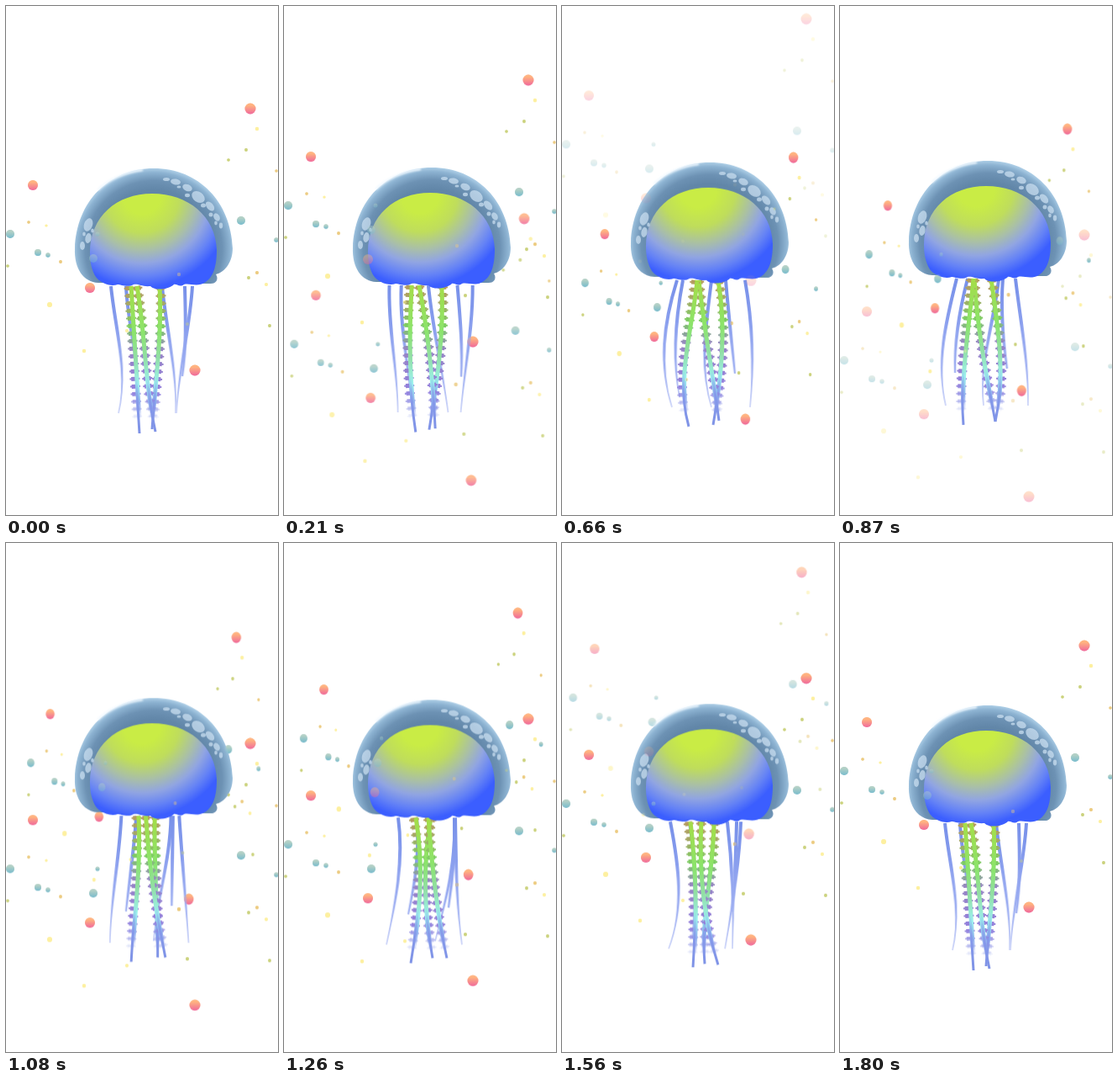
An HTML page without scripts for the animation above (1830 ms loop, 324 by 605 pixels).

```html
<!DOCTYPE html>
<html lang="en">
<head>
<meta charset="utf-8">
<title>Jellyfish</title>
<style>
  html, body { margin: 0; width: 100%; height: 100%; overflow: hidden; background: #fff; }
  svg { display: block; width: 324px; height: 605px; }

  .bob { animation: bob 1.83s infinite; }
  @keyframes bob {
    0% { transform: none; animation-timing-function: cubic-bezier(.37, 0, .63, 1); }
    52.46% { transform: translateY(-9.2px); animation-timing-function: cubic-bezier(.37, 0, .63, 1); }
    98.36%, 100% { transform: none; }
  }

  /* two copies of the bubbles rise out of phase; one also narrows */
  .first { animation: rise 1.83s steps(61, jump-none) infinite, fade 1.83s linear infinite; }
  .second { animation: rise-late 1.83s infinite, fade-late 1.83s linear infinite; }
  .squash { transform-origin: 175px 0; animation: squash 1.83s infinite; }
  .over { opacity: .42; }
  @keyframes rise {
    from { transform: translateY(164.7px); }
    to { transform: translateY(-126px); }
  }
  @keyframes rise-late {
    0% { transform: translateY(0); animation-timing-function: steps(26); }
    42.622% { transform: translateY(-126px); animation-timing-function: step-start; }
    42.623% { transform: translateY(164.7px); animation-timing-function: steps(34); }
    98.36%, 100% { transform: translateY(0); }
  }
  @keyframes fade {
    0%, 98.36%, 100% { opacity: 0; }
    14.75%, 68.85% { opacity: 1; }
  }
  @keyframes fade-late {
    0%, 13.1%, 57.38%, 100% { opacity: 1; }
    42.62% { opacity: 0; }
  }
  @keyframes squash {
    0% { transform: scaleX(1); animation-timing-function: steps(30); }
    49.18% { transform: scaleX(.82); animation-timing-function: steps(30); }
    98.36%, 100% { transform: scaleX(1); }
  }

  .tent { fill: none; }
  .thin { stroke: url(#thin); stroke-width: 1.9; }
  .thick { stroke: url(#thick); stroke-width: 4; }
  .teeth { stroke: url(#frill); stroke-width: 12; stroke-dasharray: 2 7; stroke-dashoffset: -1.5; }
  .base { stroke: url(#frill); stroke-width: 8.5; stroke-dasharray: 5 4; }
  .core { stroke: url(#core); stroke-width: 5; }
  .tip { stroke: url(#tip); stroke-width: 3; }
  .spots { fill: #c9def0; opacity: .75; }
  .pink { fill: url(#pink); }
  .teal { fill: url(#teal); }
  .pale { fill: #fdf0a0; }
  .olive { fill: #cbd27c; }
  .gold { fill: #eccb80; }
</style>
</head>
<body>
<svg viewBox="0 0 324 605">
  <defs>
    <linearGradient id="pink" x2="0" y2="1">
      <stop offset=".2" stop-color="#ffb380"/><stop offset="1" stop-color="#f06a9c"/>
    </linearGradient>
    <linearGradient id="teal" x2="0" y2="1">
      <stop offset=".2" stop-color="#b3d0c6"/><stop offset="1" stop-color="#78bccd"/>
    </linearGradient>
    <linearGradient id="thin" gradientUnits="userSpaceOnUse" x1="0" x2="0" y1="333" y2="485">
      <stop stop-color="#7088e8"/><stop offset=".6" stop-color="#93a6f0"/><stop offset="1" stop-color="#d3daf9"/>
    </linearGradient>
    <linearGradient id="thick" gradientUnits="userSpaceOnUse" x1="0" x2="0" y1="333" y2="460">
      <stop stop-color="#7790e9"/><stop offset=".4" stop-color="#8a9fee"/><stop offset="1" stop-color="#a9b8f4" stop-opacity="0"/>
    </linearGradient>
    <linearGradient id="frill" gradientUnits="userSpaceOnUse" x1="0" x2="0" y1="333" y2="492">
      <stop stop-color="#b59a5c"/><stop offset=".14" stop-color="#a5a866"/><stop offset=".3" stop-color="#7dcc62"/>
      <stop offset=".48" stop-color="#9684c4"/><stop offset=".78" stop-color="#937fdc"/><stop offset="1" stop-color="#8498ea" stop-opacity="0"/>
    </linearGradient>
    <linearGradient id="core" gradientUnits="userSpaceOnUse" x1="0" x2="0" y1="333" y2="490">
      <stop stop-color="#a5dd48"/><stop offset=".35" stop-color="#8be46c"/><stop offset=".55" stop-color="#92dfa8"/>
      <stop offset=".74" stop-color="#9df3ee"/><stop offset=".88" stop-color="#8fb0ee"/><stop offset="1" stop-color="#8498ea" stop-opacity="0"/>
    </linearGradient>
    <linearGradient id="tip" gradientUnits="userSpaceOnUse" x1="0" x2="0" y1="440" y2="508">
      <stop stop-color="#8498ea" stop-opacity="0"/><stop offset=".5" stop-color="#8498ea"/><stop offset="1" stop-color="#7f93e6"/>
    </linearGradient>
    <radialGradient id="shell" gradientUnits="userSpaceOnUse" cx="176" cy="289" r="97">
      <stop offset=".72" stop-color="#6186a8"/><stop offset=".84" stop-color="#6d92b4"/>
      <stop offset=".94" stop-color="#8db3d2"/><stop offset="1" stop-color="#b3d3ea"/>
    </radialGradient>
    <radialGradient id="dome" gradientUnits="userSpaceOnUse" cx="162" cy="225" r="112">
      <stop offset=".2" stop-color="#c9ec45"/><stop offset=".4" stop-color="#bfdd5c"/><stop offset=".58" stop-color="#a9bfa8"/>
      <stop offset=".72" stop-color="#91a5e2"/><stop offset=".86" stop-color="#6482f6"/><stop offset=".98" stop-color="#3b5eff"/>
    </radialGradient>
    <filter id="soft"><feGaussianBlur stdDeviation="1"/></filter>

    <path id="l1" d="M125 333C130 384 146 434 134 484">
      <animate attributeName="d" dur="1.83s" repeatCount="indefinite" keyTimes="0;.213;.361;.475;.689;.852;.984;1" values="M125 333C130 384 146 434 134 484;M126 333C118 384 127 434 137 484;M137 333C121 384 115 434 131 484;M139 333C126 384 114 434 126 484;M136 333C143 384 133 434 122 484;M129 333C139 384 146 434 127 484;M125 333C130 384 146 434 134 484;M125 333C130 384 146 434 134 484"/>
    </path>
    <path id="l2" d="M143 333C145 380 160 426 157 472">
      <animate attributeName="d" dur="1.83s" repeatCount="indefinite" keyTimes="0;.213;.361;.475;.689;.852;.984;1" values="M143 333C145 380 160 426 157 472;M137 333C131 380 138 426 147 472;M144 333C135 380 131 426 140 472;M152 333C141 375 136 410 137 445;M158 333C162 375 156 410 148 448;M152 333C159 380 160 426 155 472;M143 333C145 380 160 426 157 472;M143 333C145 380 160 426 157 472"/>
    </path>
    <path id="l3" d="M222 333C219 384 205 434 203 484">
      <animate attributeName="d" dur="1.83s" repeatCount="indefinite" keyTimes="0;.213;.361;.475;.689;.852;.984;1" values="M222 333C219 384 205 434 203 484;M227 333C230 384 223 434 217 484;M218 333C227 384 229 434 224 484;M209 333C215 384 225 434 224 484;M204 333C205 384 205 434 212 484;M197 333C203 384 205 434 203 484;M186 333C191 384 204 434 202 484;M186 333C191 384 204 434 202 484"/>
    </path>
    <path id="l4" d="M186 333C191 384 204 434 202 484">
      <animate attributeName="d" dur="1.83s" repeatCount="indefinite" keyTimes="0;.213;.361;.475;.689;.852;.984;1" values="M186 333C191 384 204 434 202 484;M160 333C165 384 176 434 190 484;M178 333C172 384 163 434 178 484;M189 333C184 384 165 434 171 484;M203 333C206 384 192 434 180 480;M213 333C211 384 203 434 194 484;M222 333C219 384 205 434 203 484;M222 333C219 384 205 434 203 484"/>
    </path>
    <path id="l5" d="M213 333C214 370 215 405 210 440">
      <animate attributeName="d" dur="1.83s" repeatCount="indefinite" keyTimes="0;.213;.361;.475;.689;.852;.984;1" values="M213 333C214 370 215 405 210 440;M201 333C206 370 211 405 212 443;M195 333C198 370 202 405 206 444;M194 333C191 370 194 405 199 440;M203 333C204 370 201 405 196 440;M208 333C207 370 206 405 203 440;M213 333C214 370 215 405 210 440;M213 333C214 370 215 405 210 440"/>
    </path>
    <path id="r1" d="M148 333C152 390 155 447 159 508">
      <animate attributeName="d" dur="1.83s" repeatCount="indefinite" keyTimes="0;.213;.361;.475;.689;.852;.984;1" values="M148 333C152 390 155 447 159 508;M154 333C144 390 141 447 155 507;M160 333C155 390 134 447 151 507;M158 333C153 390 142 447 147 507;M156 333C166 390 161 447 151 506;M152 333C159 390 160 447 156 506;M148 333C152 390 155 447 159 508;M148 333C152 390 155 447 159 508"/>
    </path>
    <path id="r2" d="M156 333C166 390 165 447 178 506">
      <animate attributeName="d" dur="1.83s" repeatCount="indefinite" keyTimes="0;.213;.361;.475;.689;.852;.984;1" values="M156 333C166 390 165 447 178 506;M165 333C177 390 188 447 182 501;M163 333C169 390 180 447 187 500;M160 333C163 390 174 447 185 503;M172 333C176 390 182 447 194 500;M166 333C163 390 168 447 186 503;M156 333C166 390 165 447 178 506;M156 333C166 390 165 447 178 506"/>
    </path>
    <path id="r3" d="M183 333C186 390 178 447 174 503">
      <animate attributeName="d" dur="1.83s" repeatCount="indefinite" keyTimes="0;.213;.361;.475;.689;.852;.984;1" values="M183 333C186 390 178 447 174 503;M192 333C195 390 186 447 172 506;M186 333C196 390 190 447 180 505;M180 333C188 390 198 447 185 503;M175 333C165 390 167 447 177 500;M181 333C181 390 165 447 170 502;M183 333C186 390 178 447 174 503;M183 333C186 390 178 447 174 503"/>
    </path>
    <g id="lines"><use href="#l1"/><use href="#l2"/><use href="#l3"/><use href="#l4"/><use href="#l5"/></g>

    <g id="dots">
      <g class="pink">
        <circle cx="291" cy="122" r="6.5"/><circle cx="32" cy="213" r="6"/>
        <circle cx="100" cy="335" r="6"/><circle cx="225" cy="433" r="6.5"/>
      </g>
      <g class="teal">
        <circle cx="5" cy="271" r="5"/><circle cx="38" cy="293" r="4"/><circle cx="50" cy="296" r="2.7"/>
        <circle cx="280" cy="255" r="5"/><circle cx="322" cy="278" r="2.7"/>
        <circle cx="104" cy="300" r="5"/><circle cx="109" cy="271" r="2.5"/>
      </g>
      <g class="pale">
        <circle cx="299" cy="146" r="2.2"/><circle cx="52" cy="355" r="3"/><circle cx="93" cy="410" r="2.2"/>
        <circle cx="310" cy="331" r="2"/><circle cx="48" cy="261" r="1.6"/><circle cx="144" cy="386" r="2"/>
      </g>
      <g class="olive">
        <circle cx="286" cy="171" r="1.9"/><circle cx="265" cy="183" r="1.8"/><circle cx="289" cy="323" r="1.9"/>
        <circle cx="2" cy="309" r="1.8"/><circle cx="314" cy="380" r="1.9"/><circle cx="216" cy="378" r="2"/>
      </g>
      <g class="gold">
        <circle cx="27" cy="257" r="1.8"/><circle cx="65" cy="304" r="1.9"/><circle cx="322" cy="196" r="1.7"/>
        <circle cx="206" cy="319" r="2.2"/><circle cx="299" cy="317" r="2"/>
      </g>
    </g>
  </defs>

  <g class="squash"><use class="first" href="#dots"/></g>
  <use class="second" href="#dots"/>

  <g class="bob">
    <g class="tent">
      <use class="thin" href="#lines"/>
      <use class="thick" href="#lines"/>
      <g id="rib-c">
        <use class="teeth" href="#r3" x="1"/><use class="base" href="#r3" x="1"/>
        <use class="core" href="#r3"/><use class="tip" href="#r3"/>
      </g>
      <g id="rib-b">
        <use class="teeth" href="#r2"/><use class="base" href="#r2"/>
        <use class="core" href="#r2"/><use class="tip" href="#r2"/>
      </g>
      <g id="rib-a">
        <use class="teeth" href="#r1" x="-1.5"/><use class="base" href="#r1" x="-1.5"/>
        <use class="core" href="#r1" x="1"/><use class="tip" href="#r1"/>
      </g>
    </g>

    <path fill="url(#shell)" d="M82 288C84 233 122 193 176 193C230 193 268 233 270 288C270 303 262 316 250 319C254 325 250 331 242 330L110 329C92 328 81 312 82 288Z"/>
    <path d="M110 218C124 205 140 198 162 195" fill="none" stroke="#f2f9ff" stroke-width="2.5" stroke-linecap="round" filter="url(#soft)"/>
    <path fill="url(#dome)" d="M100 293C100 250 132 223 174 223C217 223 250 250 251 290C251 312 246 322 238 328C228 335 219 329 212 331C207 335 203 330 200 331C194 337 178 339 172 333C162 334 158 330 152 331C146 335 136 331 133 331C124 334 112 329 107 322C102 314 100 304 100 293Z"/>
    <g class="spots">
      <ellipse cx="191" cy="206" rx="4" ry="2"/>
      <ellipse cx="202" cy="209" rx="6" ry="3.5" transform="rotate(10 202 209)"/>
      <ellipse cx="206" cy="215" rx="2.5" ry="1.6"/>
      <ellipse cx="216" cy="216" rx="6" ry="4" transform="rotate(22 216 216)"/>
      <ellipse cx="216" cy="225" rx="3" ry="2.2"/>
      <ellipse cx="229" cy="227" rx="8.5" ry="6" transform="rotate(35 229 227)"/>
      <ellipse cx="235" cy="237" rx="3" ry="2.5"/>
      <ellipse cx="243" cy="238" rx="6.5" ry="4" transform="rotate(50 243 238)"/>
      <ellipse cx="244" cy="248" rx="2.5" ry="2.5"/>
      <ellipse cx="251" cy="251" rx="5" ry="3.4" transform="rotate(60 251 251)"/>
      <ellipse cx="250" cy="258" rx="1.8" ry="2.4"/>
      <ellipse cx="256" cy="261" rx="2.2" ry="3.4"/>
      <ellipse cx="98" cy="260" rx="5" ry="8" transform="rotate(20 98 260)"/>
      <ellipse cx="103" cy="267" rx="1.8" ry="2.6"/>
      <ellipse cx="93" cy="271" rx="1.8" ry="2.6"/>
      <ellipse cx="98" cy="276" rx="3.6" ry="6" transform="rotate(10 98 276)"/>
      <ellipse cx="91" cy="285" rx="3" ry="5"/>
    </g>
  </g>

  <g class="over">
    <g class="squash"><use class="first" href="#dots"/></g>
    <use class="second" href="#dots"/>
  </g>
</svg>
</body>
</html>
```
